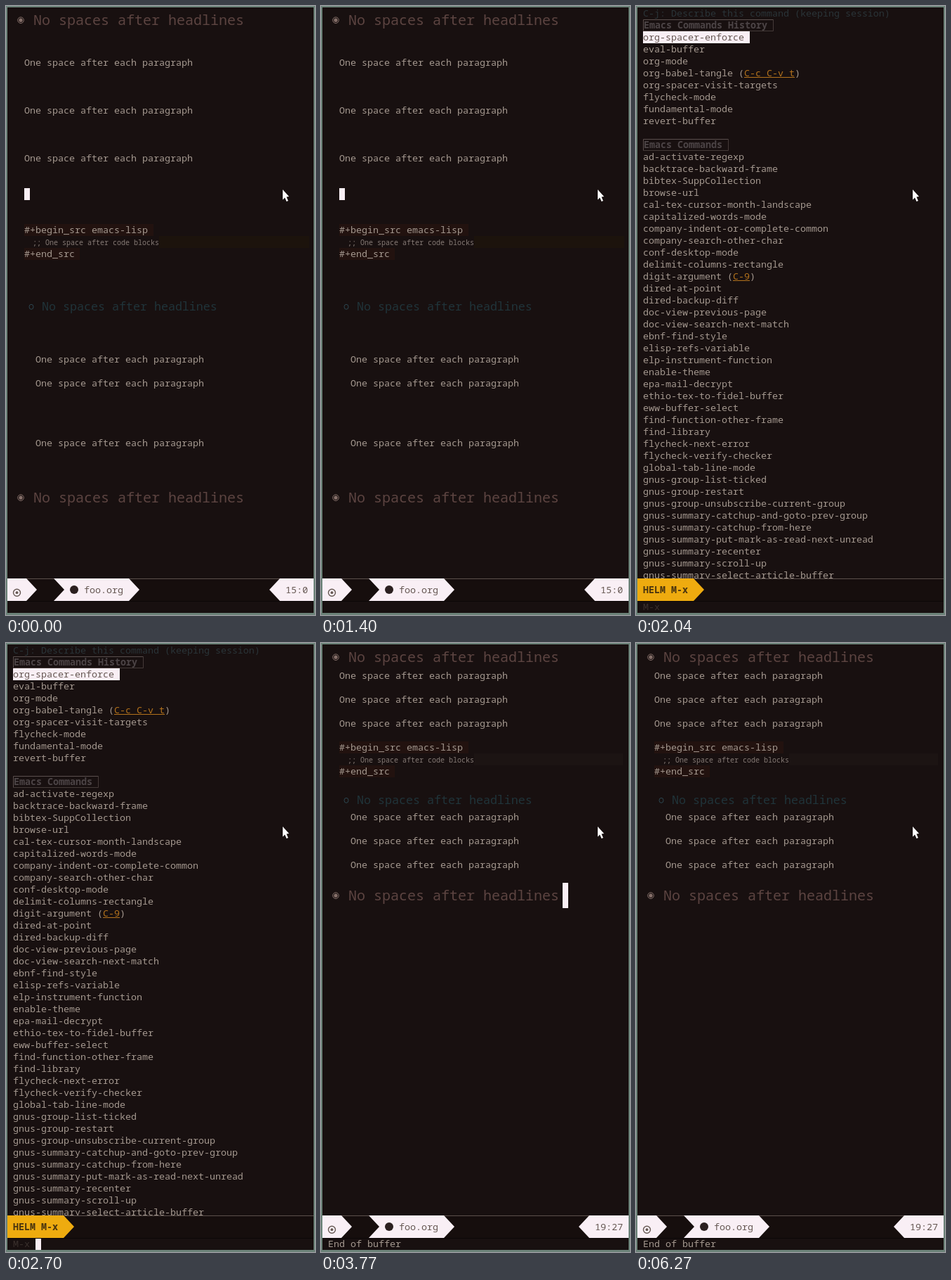
Recreate the animation shown at these times as an HTML page. Size 440 by 866 pixels, loop 6500 ms.

```html
<!DOCTYPE html>
<html lang="en">
<head>
<meta charset="utf-8">
<title>Spacing an outline</title>
<style>
  html, body { margin: 0; width: 100%; height: 100%; overflow: hidden; background: #181010; }
  svg { display: block; width: 440px; height: 866px; }
  text { font-family: "Noto Sans Mono", "Liberation Mono", monospace; font-weight: 300; white-space: pre; }
  .bold { font-weight: 700; }
</style>
</head>
<body>
<svg id="stage" viewBox="0 0 440 866" xmlns="http://www.w3.org/2000/svg"></svg>
<script>
const LOOP = 6500, ROW = 17, BODY = 40 / 3;
const C = {
  bg: '#181010', edge: '#6b8278', pale: '#f9eff5', text: '#a4988f', dim: '#857a75',
  head: '#5c4441', sub: '#20343a', bullet: '#86706a', source: '#22120f',
  bar: '#665853', gold: '#eeab0f', key: '#b3721c', faint: '#2a3438', group: '#4c4446'
};

const esc = s => s.replace(/&/g, '&amp;').replace(/</g, '&lt;');
const text = (x, y, s, fill = C.text, size = BODY, cls = '') =>
  `<text x="${x}" y="${y}" font-size="${size}" fill="${fill}" class="${cls}">${esc(s)}</text>`;
const rect = (x, y, w, h, fill, id = '') =>
  `<rect x="${x}" y="${y}" width="${w}" height="${h}" fill="${fill}"${id && ` id="${id}"`}/>`;
const poly = (points, fill) => `<polygon points="${points}" fill="${fill}"/>`;
const ring = (x, y, rx, ry, stroke, width) =>
  `<ellipse cx="${x}" cy="${y}" rx="${rx}" ry="${ry}" fill="none" stroke="${stroke}" stroke-width="${width}"/>`;
const dot = (x, y, r, fill) => `<circle cx="${x}" cy="${y}" r="${r}" fill="${fill}"/>`;
const group = (id, body) => `<g id="${id}">${body}</g>`;

// Each helper takes the top of its line.
const headline = top =>
  ring(21, top + 18.2, 4.3, 4.3, C.bullet, 1) + dot(21, top + 18.2, 2.6, C.bullet) +
  text(39, top + 25, 'No spaces after headlines', C.head, 20);
const subhead = top =>
  ring(36, top + 15.8, 3, 3.5, '#2c4650', 1) +
  text(51, top + 21, 'No spaces after headlines', C.sub, 50 / 3);
const para = (x, top) => text(x, top + 13, 'One space after each paragraph');
const block = (top, stripe, end) =>
  rect(26, top, 184, ROW, C.source) + rect(26, top + 2 * ROW, 79, ROW, C.source) +
  rect(218, top + ROW, end - 218, ROW, stripe) +
  text(26, top + 13, '#+begin_src emacs-lisp') +
  text(38, top + ROW + 13, ';; One space after code blocks', C.dim, 10) +
  text(26, top + 2 * ROW + 13, '#+end_src');

const modeline = pos => {
  const x = 430 - 8 * pos.length;
  return poly('2,814 29,814 44,830 29,846 2,846', C.pale) +
    ring(15.5, 834.2, 5, 5, C.bar, 1.4) + dot(15.5, 834.2, 1.9, C.bar) +
    poly('68,814 175,814 190,830 175,846 68,846 83,830', C.pale) +
    dot(97, 830, 6, '#2b2020') + text(111, 835, 'foo.org', C.bar) +
    poly(`${x - 8},814 438,814 438,846 ${x - 8},846 ${x - 23},830`, C.pale) +
    text(x, 835, pos, C.bar);
};

const doc = (paras, subParas, src, sub, last, stripe, end, pos) =>
  headline(2) + paras.map(y => para(26, y)).join('') + block(src, stripe, end) +
  subhead(sub) + subParas.map(y => para(42, y)).join('') + headline(last) + modeline(pos);

const recent = `org-spacer-enforce eval-buffer org-mode org-babel-tangle
  org-spacer-visit-targets flycheck-mode fundamental-mode revert-buffer`.split(/\s+/);
const commands = `ad-activate-regexp backtrace-backward-frame bibtex-SuppCollection browse-url
  cal-tex-cursor-month-landscape capitalized-words-mode company-indent-or-complete-common
  company-search-other-char conf-desktop-mode delimit-columns-rectangle digit-argument
  dired-at-point dired-backup-diff doc-view-previous-page doc-view-search-next-match
  ebnf-find-style elisp-refs-variable elp-instrument-function enable-theme epa-mail-decrypt
  ethio-tex-to-fidel-buffer eww-buffer-select find-function-other-frame find-library
  flycheck-next-error flycheck-verify-checker global-tab-line-mode gnus-group-list-ticked
  gnus-group-restart gnus-group-unsubscribe-current-group
  gnus-summary-catchup-and-goto-prev-group gnus-summary-catchup-from-here
  gnus-summary-put-mark-as-read-next-unread gnus-summary-recenter gnus-summary-scroll-up
  gnus-summary-select-article-buffer`.split(/\s+/);
const keys = { 'org-babel-tangle': 'C-c C-v t', 'digit-argument': 'C-9' };

const rowTop = i => 2 + ROW * i;
const entry = (name, i) => {
  const y = rowTop(i) + 13, key = keys[name];
  if (!key) return text(10, y, name, i === 2 ? C.bar : C.text);
  const x = 10 + 8 * (name.length + 2), w = 8 * key.length;
  return text(10, y, name + ' (') + text(x, y, key, C.key) +
    rect(x, y + 1, w, 1, C.key) + text(x + w, y, ')');
};
const title = (label, i) => {
  const y = rowTop(i), w = 8 * label.length + 9;
  return `<path d="M10.5 ${y + 16.5}V${y + 0.5}H${10.5 + w}" fill="none" stroke="#5a4f4d"/>` +
    `<path d="M10.5 ${y + 16.5}H${10.5 + w}V${y + 0.5}" fill="none" stroke="#443a38"/>` +
    text(11, y + 13, label, C.group, BODY, 'bold');
};
const helm =
  `<g clip-path="url(#list)">` +
  text(10, 15, 'C-j: Describe this command (keeping session)', C.faint) +
  title('Emacs Commands History', 1) + rect(10, rowTop(2), 152, ROW, C.pale) +
  recent.map((name, i) => entry(name, i + 2)).join('') +
  title('Emacs Commands', 11) +
  commands.map((name, i) => entry(name, i + 12)).join('') + '</g>' +
  poly('2,814 82,814 97,830 82,846 2,846', C.gold) +
  text(10, 835, 'HELM M-x', '#4a350f', BODY, 'bold') +
  text(10, 859, 'M-x', '#3a302d');

const stage = document.getElementById('stage');
stage.innerHTML =
  '<defs><clipPath id="list"><rect x="2" y="2" width="436" height="812"/></clipPath></defs>' +
  rect(0, 0, 440, 866, C.edge) + rect(2, 2, 436, 861, C.bg) +
  rect(2, 814, 436, 32, '#160e0d') + rect(2, 814, 436, 1, '#5b504c') +
  rect(2, 846, 436, 1, '#0b0707') +
  group('loose', doc([72, 140, 208], [494, 528, 613], 310, 412, 681, '#1c130c', 432, '15:0')) +
  group('helm', helm) +
  group('tidy', doc([38, 72, 106], [239, 273, 307], 140, 208, 341, '#1c1413', 430, '19:27') +
    text(10, 859, 'End of buffer')) +
  rect(0, 0, 8, ROW, C.pale, 'caret') +
  poly('394,261 394,275.5 397,272.5 399.5,278 401.8,277 399.4,271.5 403,271', '#fff');

// Scene start, first blink, and caret box.
const scenes = [
  { id: 'loose', start: 0, blink: 500, x: 26, y: 259, h: 17 },
  { id: 'helm', start: 1430, blink: 1930, x: 42, y: 847, h: 16 },
  { id: 'tidy', start: 2740, blink: 3270, x: 344, y: 341, h: 36 }
];
const caret = document.getElementById('caret');
const show = (el, on) => el.setAttribute('visibility', on ? 'visible' : 'hidden');

function draw(t) {
  const now = scenes.filter(s => t >= s.start).pop();
  for (const s of scenes) show(document.getElementById(s.id), s === now);
  caret.setAttribute('x', now.x);
  caret.setAttribute('y', now.y);
  caret.setAttribute('height', now.h);
  show(caret, t < now.blink || Math.floor((t - now.blink) / 500) % 2 === 1);
}

const begin = performance.now();
function tick() {
  draw((performance.now() - begin) % LOOP);
  requestAnimationFrame(tick);
}
tick();
</script>
</body>
</html>
```
